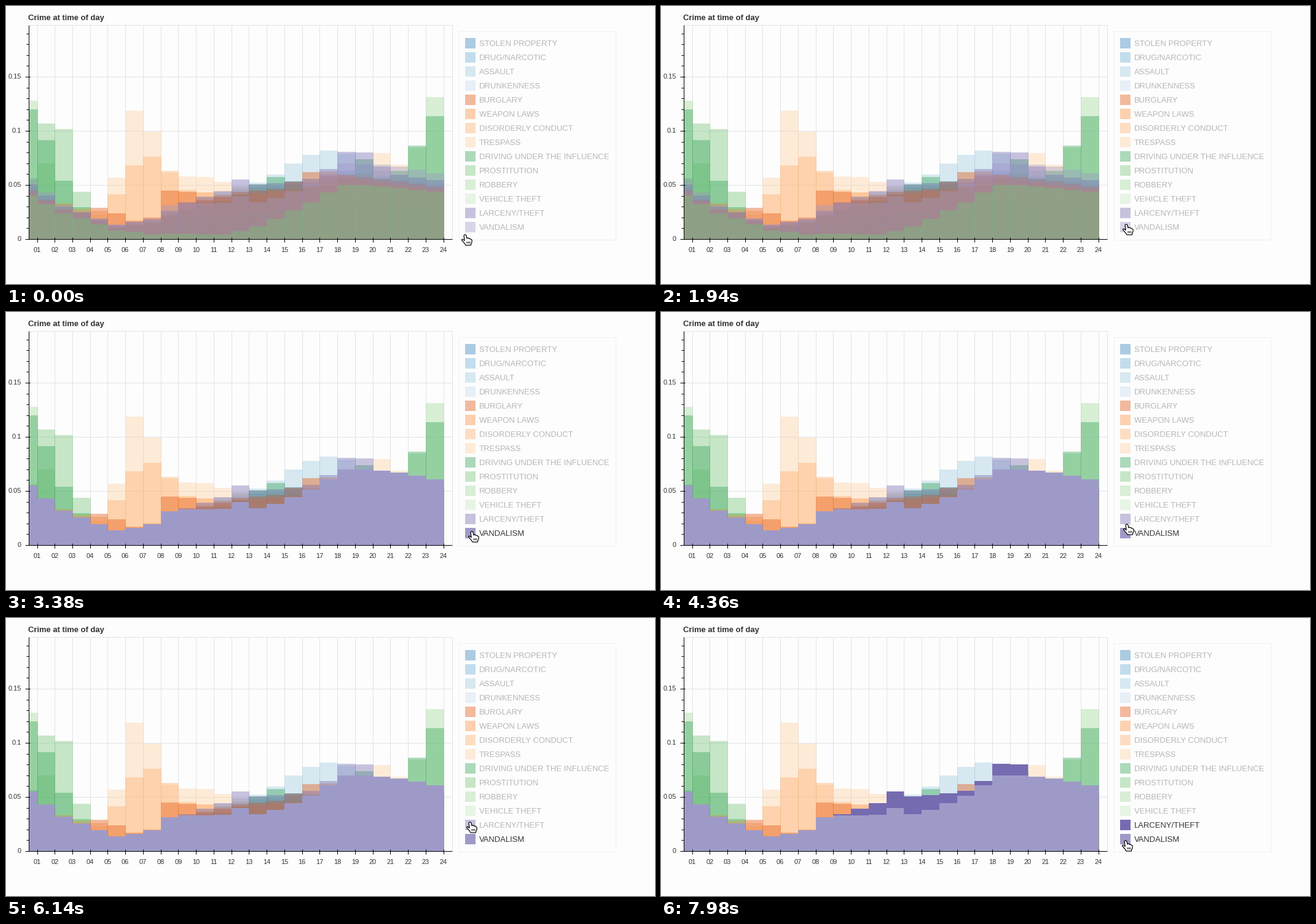
Recreate the animation shown at these times as a matplotlib script. Size 1056 by 452 pixels, loop 8 s.

```python
import numpy as np
import matplotlib.pyplot as plt
from matplotlib.animation import FuncAnimation
from matplotlib.collections import LineCollection, PolyCollection
from matplotlib.patches import Polygon, Rectangle

W, H, DPI = 1056, 452, 64
PX = 72 / DPI                      # points per pixel
STEP, LOOP = 40, 8000              # milliseconds

PAPER, INK, GRID, FADED_INK = "#fdfdfd", "#333333", "#e3e3e8", "#b6b6b6"
LEFT, RIGHT, TOP, BASE = 36.5, 725.5, 30.5, 378.5
UNIT = 1.76                        # pixels per thousandth
MUTED = 0.4
COLORS = plt.get_cmap("tab20c").colors

NAMES = ["STOLEN PROPERTY", "DRUG/NARCOTIC", "ASSAULT", "DRUNKENNESS", "BURGLARY",
         "WEAPON LAWS", "DISORDERLY CONDUCT", "TRESPASS",
         "DRIVING UNDER THE INFLUENCE", "PROSTITUTION", "ROBBERY",
         "VEHICLE THEFT", "LARCENY/THEFT", "VANDALISM"]
LARCENY, VANDALISM = 12, 13

fig = plt.figure(figsize=(W / DPI, H / DPI), dpi=DPI, facecolor=PAPER)
ax = fig.add_axes([0, 0, 1, 1])
ax.set_xlim(0, W)
ax.set_ylim(H, 0)
ax.axis("off")

hours = np.arange(24)
edges = np.append(LEFT, 50.5 + 28.74 * hours)

# Daily rhythm shared by all series, in thousandths per hour
rhythm = np.interp(hours, [0, 2, 5, 7, 9, 12, 16, 18, 23],
                   [50, 30, 13, 18, 34, 48, 55, 66, 54])


def rates(scale, *bumps):
    """Scaled rhythm plus bumps given as (hour, height, width)."""
    total = scale * rhythm
    for centre, height, width in bumps:
        gap = (hours - centre + 12) % 24 - 12
        total = total + height * np.exp(-(gap / width) ** 2)
    return np.maximum(total, 4)


def label(x, y, text, size=11, color=INK, **kw):
    return ax.text(x, y, text, fontsize=size * PX, color=color,
                   family="Liberation Sans", va="baseline", **kw)


def lines(segments, color, z):
    ax.add_collection(LineCollection(segments, colors=[color], linewidths=PX, zorder=z))


def bars(heights, color, alpha, z):
    boxes = [[(a, BASE), (a, BASE - UNIT * h), (b, BASE - UNIT * h), (b, BASE)]
             for a, b, h in zip(edges, edges[1:], heights)]
    group = PolyCollection(boxes, facecolors=[(*color, alpha)],
                           edgecolors=[(*color, alpha / 2)],
                           linewidths=PX if alpha < 1 else 0, zorder=z)
    ax.add_collection(group)
    return group


# Grid
lines([[(x, TOP), (x, BASE)] for x in [*edges[1:], RIGHT]], GRID, 1)
lines([[(LEFT, y), (RIGHT, y)] for y in (TOP, 114.5, 202.5, 290.5)], GRID, 1)

# Muted histograms as (colour, rates), painted in this order
larceny = rates(1, (12, 7, 0.6), (18.6, 18, 1.3))
vandalism = rates(1, (13, -16, 3), (21, 8, 4), (12, 6, 0.5), (8, 6, 0.8))
layers = [
    (1, rates(0.95)),
    (2, rates(1, (16.3, 23, 2.2))),
    (7, rates(0.85, (6.2, 100, 1.3), (9, 28, 2.6), (20.3, 30, 1))),
    (6, rates(0.85, (6.7, 62, 2))),
    (10, rates(0.9, (23.5, 92, 1.5))),
    (9, rates(0.5, (1.5, 98, 1.4))),
    (8, rates(0.8, (23.8, 80, 2.2), (19, 22, 0.7), (14, 16, 1.5))),
    (5, rates(0.85, (2.5, 9, 1), (10, 10, 1), (17, 11, 0.8))),
    (4, rates(0.9, (4.5, 14, 1.2), (8.3, 24, 0.9), (16, 12, 1))),
    (LARCENY, larceny),
    (VANDALISM, vandalism),
    (9, rates(0.8, (11.5, -32, 4.2))),
]
for index, heights in layers:
    bars(heights, COLORS[index], MUTED, 2)

# Axes
lines([[(LEFT, TOP), (LEFT, BASE)], [(LEFT, BASE), (RIGHT, BASE)]], "black", 5)
lines([[(x, 376), (x, 384)] for x in edges[1:]], "black", 5)
for k in range(20):
    y = round(378 - 17.6 * k) + 0.5
    major = k % 5 == 0
    lines([[(30.5 if major else 32.5, y), (39 if major else LEFT, y)]], "black", 5)
    if major:
        label(25, y + 3.5, f"{k / 100:g}", ha="right")
for hour, x in enumerate(edges[1:], 1):
    label(x, 400, f"{hour:02d}", ha="center")
label(36, 23, "Crime at time of day", 13, weight="bold")

# Legend
ax.add_patch(Rectangle((736.5, 40.5), 255, 339, fc="none", ec="#f0f0f3", lw=PX))
entries = []
for i, name in enumerate(NAMES):
    y = 52 + 23 * i
    swatch = ax.add_patch(Rectangle((747, y), 17, 17, fc=(*COLORS[i], MUTED), lw=0))
    entries.append((swatch, label(770, y + 13, name, 13, FADED_INK)))

# Series that get switched on: (index, time, opaque bars)
switches = [(LARCENY, 6760, bars(larceny, COLORS[LARCENY], 1, 3)),
            (VANDALISM, 2960, bars(vandalism, COLORS[VANDALISM], 1, 4))]

# Cursor
HAND = np.array([(-2, 1.5), (-1, 0), (1, 0), (2, 1.5), (3, 6), (4, 5), (6, 5.4),
                 (6.8, 6.4), (8, 6.2), (9.4, 7.2), (10.6, 7.8), (11.2, 9), (11, 12),
                 (9.8, 14.5), (9.4, 17), (1, 17), (-0.8, 14), (-3.4, 11.2),
                 (-5.4, 8.6), (-5, 7.3), (-3.6, 7.4), (-0.8, 9.6)])
ARROW = np.array([(0, 0), (0, 14.5), (3.3, 11.4), (5.6, 17), (8, 16), (5.7, 10.6),
                  (10, 10.4)])
KNUCKLES = np.array([[(x, 11), (x + 0.2, 14.2)] for x in (3, 5.3, 7.6)])
ARROW_FROM, ARROW_TO = 2200, 2960
PATH = np.array([(0, 747, 372), (600, 747, 372), (1140, 753, 359), (1560, 757, 355),
                 (2680, 758, 353), (3380, 758, 357), (4360, 758, 345),
                 (6140, 755, 332), (7200, 755, 332), (7980, 756, 362)])
cursor = ax.add_patch(Polygon(HAND, fc="white", ec="black", lw=1.2 * PX, zorder=9))
knuckles = LineCollection(KNUCKLES, colors="black", linewidths=PX, zorder=10)
ax.add_collection(knuckles)


def cursor_at(t):
    i = min(np.searchsorted(PATH[:, 0], t, side="right"), len(PATH) - 1)
    (t0, *a), (t1, *b) = PATH[i - 1], PATH[i]
    u = min((t - t0) / (t1 - t0), 1)
    u = u * u * (3 - 2 * u)
    return np.round(np.array(a) * (1 - u) + np.array(b) * u)


def update(frame):
    t = frame * STEP
    for index, start, group in switches:
        on = t >= start
        swatch, text = entries[index]
        group.set_visible(on)
        swatch.set_facecolor((*COLORS[index], 1 if on else MUTED))
        text.set_color(INK if on else FADED_INK)
    tip = cursor_at(t)
    arrow = ARROW_FROM <= t < ARROW_TO
    cursor.set_xy((ARROW if arrow else HAND) + tip)
    cursor.set_facecolor("black" if arrow else "white")
    cursor.set_edgecolor("white" if arrow else "black")
    knuckles.set_segments(KNUCKLES + tip)
    knuckles.set_visible(not arrow)
    return []


anim = FuncAnimation(fig, update, frames=LOOP // STEP, interval=STEP,
                     init_func=lambda: update(0), repeat=True, repeat_delay=0)
plt.show()
```
